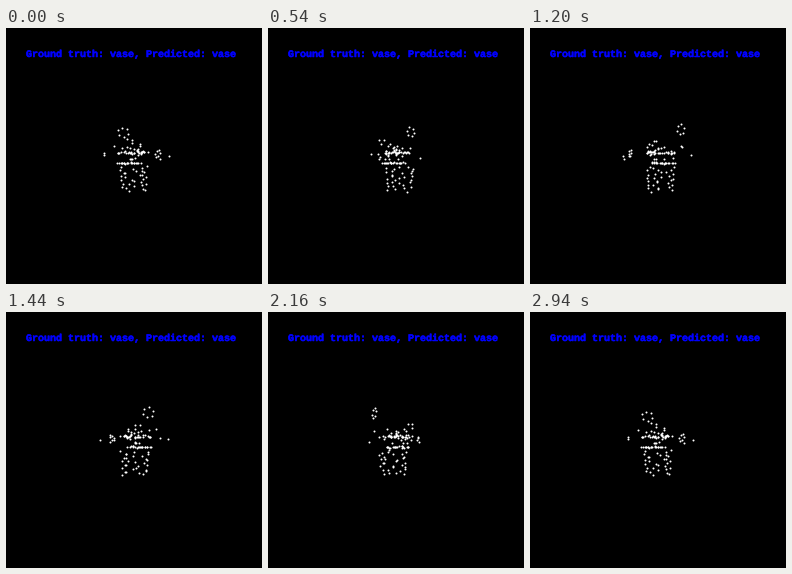
Animation, 256 px wide and 256 px high, one loop 3000 ms. Source, as a matplotlib script:

```python
import numpy as np
import matplotlib.pyplot as plt
from matplotlib.animation import FuncAnimation
from matplotlib.patheffects import withStroke

SIZE, DPI = 256, 100
PX = 72 / DPI  # one pixel in points
FRAMES, INTERVAL = 50, 60
CENTER = 128
CAMERA = 300  # viewing distance in pixels
BLUE = "#0000ff"

# Single leaf tips: x, z (depth), y (down), relative to the center
TIPS = [(-31.5, 14, -1), (-28.5, -17, -2.5), (1, 27, 1.8), (24, -27, 2.6),
        (34, -9, 0.3), (-21, 10, -10.5), (-13, 22, -9)]


def loop(n, start, mid, a, b):
    """Points around an ellipse with half axes a and b."""
    t = np.radians(start) + 2 * np.pi * np.arange(n)[:, None] / n
    return np.array(mid) + np.cos(t) * np.array(a) + np.sin(t) * np.array(b)


def disc(rng, n, mid, radius, thickness):
    """Points scattered evenly over a flat horizontal disc."""
    t = rng.uniform(0, 2 * np.pi, n)
    r = radius * np.sqrt(rng.uniform(0, 1, n))
    y = rng.uniform(-thickness, thickness, n)
    return np.array(mid) + np.column_stack([r * np.cos(t), r * np.sin(t), y])


def wall(rng, n, mid, top, bottom, r_top, r_bottom):
    """Points on a tapered pot wall, spread by the golden angle."""
    k = (np.arange(n) + 0.5) / n
    t = np.pi * (3 - np.sqrt(5)) * np.arange(n) + rng.uniform(-0.4, 0.4, n)
    r = r_top + (r_bottom - r_top) * k
    y = top + (bottom - top) * k
    return np.array(mid) + np.column_stack([r * np.cos(t), r * np.sin(t), y])


def build_cloud():
    rng = np.random.default_rng(5)
    return np.vstack([
        TIPS,
        loop(6, -40, (-11.6, 22, -25.7), (5.5, 1.8, 0), (0, 0.5, 4.8)),
        loop(6, 0, (22, -19, -2.5), (2.5, 7, -0.8), (-1, -3, 3)),
        loop(5, 180, (0, -12.5, -13), (7, 3, 3), (0, -2, 2)),
        disc(rng, 24, (-1, 1, -3.7), 17, 1),
        disc(rng, 14, (0, 0, -2), 11, 7),
        disc(rng, 20, (-5, 0, 7), 13, 0.6),
        wall(rng, 30, (0, 3.5, 0), 10, 35, 14, 12),
    ])


def project(cloud, angle):
    x, z, y = cloud.T
    c, s = np.cos(angle), np.sin(angle)
    scale = CAMERA / (CAMERA - (x * s - z * c))
    return np.column_stack([(x * c + z * s) * scale, y * scale]) + CENTER


fig = plt.figure(figsize=(SIZE / DPI, SIZE / DPI), dpi=DPI, facecolor="black")
ax = fig.add_axes([0, 0, 1, 1])
ax.set(xlim=(0, SIZE), ylim=(SIZE, 0))
ax.axis("off")

ax.text(20, 29, "Ground truth: vase, Predicted: vase", color=BLUE,
        family="Liberation Mono", weight="bold", size=10 * PX, va="baseline",
        path_effects=[withStroke(linewidth=0.5 * PX, foreground=BLUE)])

cloud = build_cloud()
dots = ax.scatter(*project(cloud, 0).T, s=(2 * PX) ** 2,
                  color="white", linewidths=0)


def update(i):
    # the last frame completes the turn
    dots.set_offsets(project(cloud, 2 * np.pi * i / (FRAMES - 1)))
    return dots,


anim = FuncAnimation(fig, update, frames=FRAMES, interval=INTERVAL,
                     repeat=True, repeat_delay=0)
plt.show()
```
